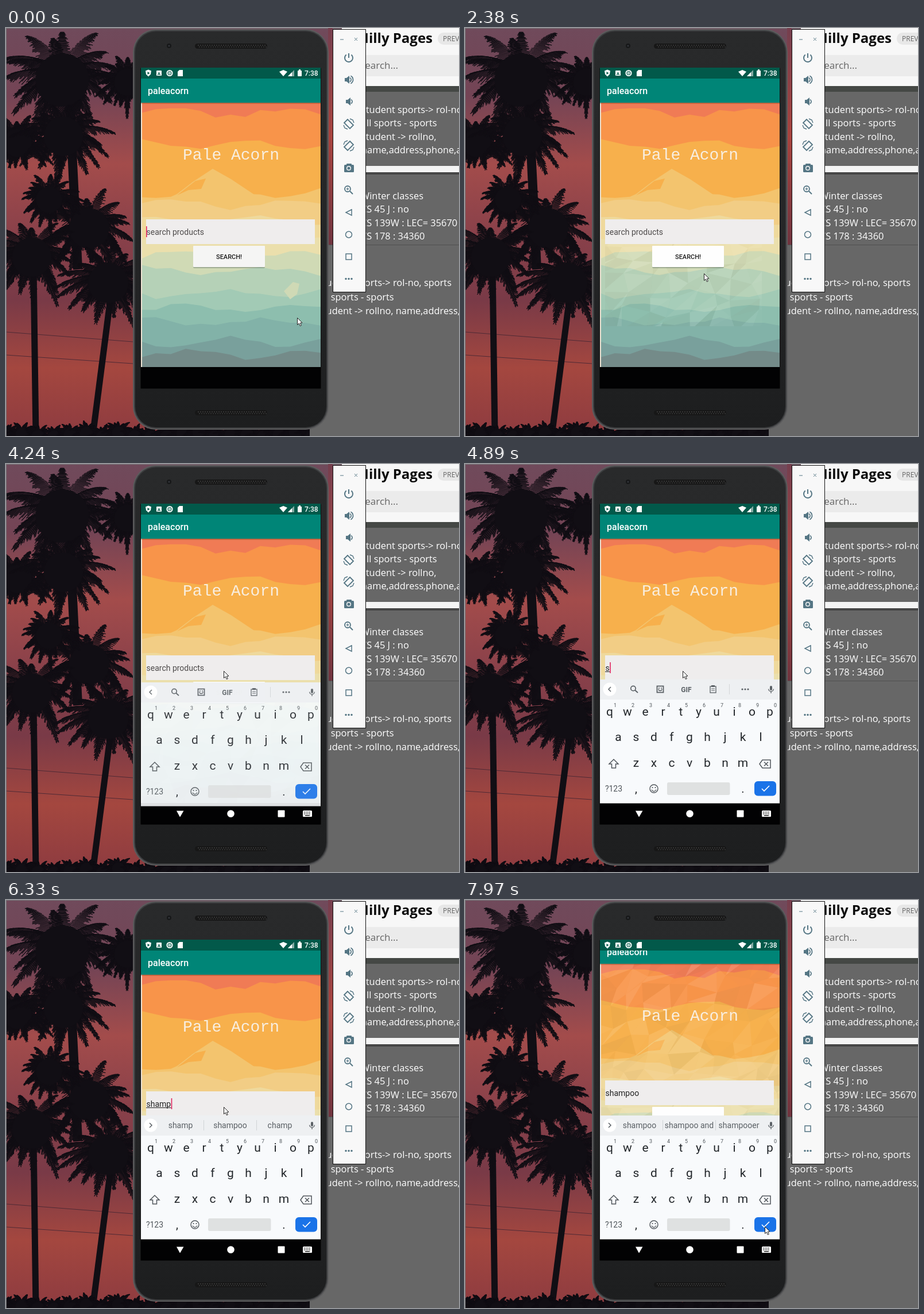
Write an HTML page with a canvas that moves like this. It is 789 px wide and 710 px high and loops after 8000 ms.

```html
<!DOCTYPE html>
<html lang="en">
<head>
<meta charset="utf-8">
<title>Product search demo</title>
<style>
html, body { margin: 0; width: 100%; height: 100%; overflow: hidden; background: #676767; }
canvas { display: block; }
</style>
</head>
<body>
<canvas id="stage" width="789" height="710"></canvas>
<script>
const W = 789, H = 710, LOOP = 8000;
const SANS = '"Open Sans", "Noto Sans", sans-serif', ROBOTO = 'Roboto, sans-serif';
const screen = document.getElementById('stage').getContext('2d');
let g = screen;

// Drawing helpers
function rect(x, y, w, h, fill, r = 0) {
  g.fillStyle = fill;
  g.beginPath();
  g.roundRect(x, y, w, h, r);
  g.fill();
}
function disc(x, y, r, fill) {
  g.fillStyle = fill;
  g.beginPath();
  g.arc(x, y, r, 0, 7);
  g.fill();
}
function ring(x, y, r, color, width = 1.5, from = 0, to = 7) {
  g.strokeStyle = color;
  g.lineWidth = width;
  g.beginPath();
  g.arc(x, y, r, from, to);
  g.stroke();
}
function trace(points, x = 0, y = 0) {
  g.beginPath();
  for (let i = 0; i < points.length; i += 2) g.lineTo(x + points[i], y + points[i + 1]);
}
function line(points, color, width = 1.5, x = 0, y = 0) {
  trace(points, x, y);
  g.strokeStyle = color;
  g.lineWidth = width;
  g.stroke();
}
function poly(points, fill, x = 0, y = 0) {
  trace(points, x, y);
  g.fillStyle = fill;
  g.fill();
}
function text(str, x, y, font, fill, align = 'left') {
  g.font = font;
  g.fillStyle = fill;
  g.textAlign = align;
  g.fillText(str, x, y);
}
function layer(draw) {
  const canvas = document.createElement('canvas');
  canvas.width = W;
  canvas.height = H;
  g = canvas.getContext('2d');
  draw();
  g = screen;
  return canvas;
}
function seeded(seed) {
  return () => (seed = seed * 16807 % 2147483647) / 2147483647;
}
function gradient(y0, y1, ...colors) {
  const fill = g.createLinearGradient(0, y0, 0, y1);
  colors.forEach((c, i) => fill.addColorStop(i / (colors.length - 1), c));
  return fill;
}

// Dusk sky behind dense palm silhouettes
const BARK = '#110e14';
function palm(x, y, reach, rand) {
  const fronds = 19;
  for (let i = 0; i < fronds; i++) {
    const a = (i + rand()) / fronds * Math.PI * 2, len = reach * (.7 + rand() * .4);
    const [cos, sin] = [Math.cos(a), Math.sin(a)];
    for (let s = .08; s < 1; s += .022) {
      const px = x + cos * len * s, py = y + len * (sin * .85 * s + .38 * s * s - .12 * s);
      const leaf = reach * .27 * (1.15 - s) * (.6 + rand() * .6);
      for (const side of [-1, 1]) {
        const b = a + side * .6;
        line([px, py, px + Math.cos(b) * leaf, py + Math.sin(b) * leaf * .7 + leaf * .6], BARK, 1.3);
      }
    }
  }
  disc(x, y + reach * .15, reach * .38, BARK);
}
function photo() {
  rect(0, 0, 585, H, gradient(0, H, '#704a5b', '#744455', '#a34c4b', '#8a414a', '#793a47', '#a4473f', '#8d3b40'));
  line([0, 529, 221, 546], '#4f2a35', 1);
  line([0, 569, 221, 584], '#4f2a35', 1);
  const rand = seeded(71);
  line([48, 420, 52, H], BARK, 11);
  line([182, 470, 151, H], BARK, 11);
  line([108, 70, 125, 420], BARK, 16);
  for (const [x, y, reach] of [[98, 72, 122], [212, 85, 62], [20, 190, 65], [100, 175, 90], [145, 335, 92], [45, 385, 90], [178, 430, 92], [75, 290, 60]])
    palm(x, y, reach, rand);
  for (let x = 0; x < 540; x += 28) palm(x, 698 + rand() * 10, 30, rand);
  rect(0, 0, 1, H, '#77777a');
  rect(0, 0, 585, 1, '#77777a');
}

function notes() {
  rect(585, 0, 204, 101, '#f7f7f7');
  text('Hilly Pages', 743, 26, 'bold 24px ' + SANS, '#0b0b0b', 'right');
  rect(752, 8, 60, 21, '#e7e7e7', 10);
  text('PREVIEW', 761, 23, '12px ' + SANS, '#666');
  rect(585, 47, 204, 37, '#ebebeb');
  text('Search...', 616, 71, '17px ' + SANS, '#666');
  rect(585, 101, 204, 10, '#454845');
  rect(585, 111, 204, 266, '#676767');
  rect(585, 240, 204, 11, '#f4f4f4');
  rect(585, 251, 204, 4, '#464646');
  rect(561, 0, 8, 377, gradient(0, 377, '#753f4e', '#a9443f', '#70343f'));
  rect(529, 377, 260, 333, '#676767');
  rect(561, 377, 228, 1, '#515151');
  const write = (lines, x, y, gap) => lines.forEach((s, i) => text(s, x, y + i * gap, '16.4px ' + SANS, '#fff'));
  write(['student sports-> rol-no, sports', 'all sports - sports', 'student -> rollno,', 'name,address,phone,age'], 619, 148, 23.3);
  write(['Winter classes', 'CS 45 J : no', 'CS 139W : LEC= 35670', 'CS 178 : 34360'], 618, 298, 23.4);
  write(['student sports-> rol-no, sports', 'all sports - sports', 'student -> rollno, name,address,phone'], 544, 449, 24.5);
}

function emulatorBar() {
  const c = '#557684', x = 597;
  rect(569, 2, 58, 458, '#111');
  rect(570, 3, 56, 456, '#f8f8f8');
  line([582, 20, 588, 20], c, 1);
  line([607, 17, 612, 22], c, 1);
  line([612, 17, 607, 22], c, 1);
  ring(x, 52, 7, c, 2, -.9, 4.05);
  line([x, 44, x, 52], c, 2);
  for (const [y, dx] of [[90, 0], [128, 2]]) {
    poly([-7, -3, -4, -3, 1, -7, 1, 7, -4, 3, -7, 3], c, x + dx, y);
    ring(x + dx, y, 4, c, 1.8, -1.1, 1.1);
    if (!dx) ring(x, y, 7.5, c, 1.8, -1.1, 1.1);
  }
  for (const [y, s] of [[167, 1], [205, -1]]) {
    line([-8 * s, -2, -2 * s, -8, 8 * s, 2, 2 * s, 8, -8 * s, -2, -2 * s, -8], c, 1.8, x, y);
    for (const k of [-1, 1]) line([2 * s * k, -9 * k, 7 * s * k, -7 * k, 9 * s * k, -2 * k], c, 1.4, x, y);
  }
  rect(589, 238, 17, 13, c, 1.5);
  rect(593, 236, 9, 4, c, 1);
  disc(x, 244, 4, '#f8f8f8');
  disc(x, 244, 2.6, c);
  ring(595, 280, 5, c, 1.8);
  line([599, 284, 604, 289], c, 2);
  line([592.5, 280, 597.5, 280], c, 1.2);
  line([595, 277.5, 595, 282.5], c, 1.2);
  line([602, 316, 592, 321, 602, 326, 602, 315], c, 1.5);
  ring(x, 359.5, 5.5, c, 1.5);
  g.strokeRect(592, 393, 10, 10);
  for (const dx of [-5, 0, 5]) disc(x + dx, 436.5, 1.7, c);
}

function phone() {
  rect(221, 2, 341, 697, '#5b5b5c', 40);
  rect(223, 4, 337, 693, '#3c3d3f', 38);
  rect(225, 6, 333, 689, gradient(6, 695, '#292a2b', '#252627', '#1d1e1f'), 36);
  rect(234, 69, 315, 559, '#111', 2);
  disc(284, 31, 4, '#171819');
  disc(284, 31, 1.6, '#34363c');
  for (const y of [27, 665]) {
    rect(329, y, 126, 9, '#171717', 4.5);
    for (let x = 334; x < 452; x += 4) {
      rect(x, y + 2, 2, 2, '#353535');
      rect(x + 2, y + 5, 2, 2, '#303030');
    }
  }
}

// Wallpaper: stacked jagged ridges, optionally broken into facets
const ridges = [['#f07b55', 120], ['#f8944a', 147], ['#f7b04c', 203], ['#f3c46e', 286], ['#f2cd85', 306],
  ['#efd99c', 336], ['#ebdfac', 366], ['#d0dab5', 395], ['#b5d1b7', 422], ['#a2cab5', 462],
  ['#8dbeae', 488], ['#82b2a8', 512], ['#79a09c', 546], ['#748b89', 567]];
function wallpaper(faceted) {
  const rand = seeded(29);
  g.beginPath();
  g.rect(235, 130, 313, 460);
  g.clip();
  ridges.forEach(([fill, base], i) => {
    const edge = [235, 590];
    for (let x = 235; x <= 575; x += 26)
      edge.push(x, base + 7 * Math.sin(x / 32 + i * 2) + (rand() - .5) * 8);
    poly([...edge, 575, 590], fill);
    if (i === 3) {
      poly([290, 295, 325, 268, 360, 245, 392, 263, 440, 295], fill);
      poly([298, 291, 330, 266, 348, 262, 340, 280, 318, 282], '#f7b04c');
    }
  });
  if (faceted) {
    const dx = 36, dy = 29, grid = [];
    for (let r = 0; r < 19; r++)
      grid.push(Array.from({ length: 12 }, (_, c) => [200 + (c + rand() * .8) * dx, 105 + (r + rand() * .8) * dy]));
    const shade = () => rand() < .5 ? `rgba(255,255,240,${rand() * .12})` : `rgba(110,100,70,${rand() * .07})`;
    for (let r = 0; r < 18; r++) for (let c = 0; c < 11; c++) {
      const [a, b, d, e] = [grid[r][c], grid[r][c + 1], grid[r + 1][c], grid[r + 1][c + 1]];
      poly([...a, ...b, ...d], shade());
      poly([...b, ...e, ...d], shade());
    }
  } else {
    poly([484, 458, 500, 442, 511, 445, 507, 463, 495, 472], '#cfd9b5');
  }
  rect(235, 130, 2, 460, '#eee4d4');
}

const backdrop = layer(() => { photo(); notes(); phone(); emulatorBar(); });
const flatWall = layer(() => wallpaper(false));
const facetWall = layer(() => wallpaper(true));

function statusBar() {
  rect(235, 69, 313, 19, '#02594a');
  poly([0, -6, 5, -4, 4, 2, 0, 6, -4, 2, -5, -4], '#fff', 248, 78.5);
  poly([-1.5, -2.5, 2.5, 0, -1.5, 2.5], '#02594a', 248, 78.5);
  rect(262, 74, 9, 9, '#fff', 1);
  text('A', 266.5, 82, 'bold 8px ' + ROBOTO, '#02594a', 'center');
  ring(285, 78.5, 4.6, '#fff', 2);
  disc(285, 78.5, 2.8, '#aac8c3');
  poly([0, 3, 3, 0, 9, 0, 9, 11, 0, 11], '#fff', 299, 73);
  poly([476, 76, 483, 73, 490, 76, 483, 84], '#fff');
  poly([491, 84, 502, 84, 502, 73], '#86aaa4');
  poly([491, 84, 498, 84, 498, 77], '#fff');
  rect(508, 74, 7, 10, '#fff', 1);
  rect(510, 72, 3, 3, '#fff');
  text('7:38', 520, 83, '500 12px ' + ROBOTO, '#fff');
}

// Timing
const NAV_SHOWN = 4120, KEYS_RISE = 4240, KEYS_UP = 4390, FOCUS_LOST = 6970, SCROLLED = 7970;
const WORD = 'shampoo', keyTimes = [4890, 5200, 5480, 5910, 6180, 6450, 6580], LAG = 135;
const lettersAt = t => keyTimes.filter(k => k <= t).length;
const suggestions = ['s so she', 'sh she should', 'sha shall share', 'sham same shame', 'shamp shampoo champ', 'shampo shampoo shampoos']
  .map(s => s.split(' ')).concat([['shampoo', 'shampoo and', 'shampooer']]);

function caretOn(t) {
  if (t < NAV_SHOWN) return Math.floor((t - 310) / 508) % 2 !== 0;
  return t >= keyTimes[0] && t < FOCUS_LOST;
}

// The pointer advances in hard steps along straight moves
const TICK = 125;
const moves = [[60, 2, 416, 427], [2970, 4, 379, 360], [6985, 3, 514, 561], [7395, 1, 522, 568]];
function pointerAt(t) {
  let [x, y] = [507, 504];
  for (const [from, ticks, toX, toY] of moves) {
    const p = Math.max(0, Math.min(1, Math.floor((t - from) / TICK) / ticks));
    x += (toX - x) * p;
    y += (toY - y) * p;
  }
  return [x, y];
}

function app(t) {
  const scrolled = t >= SCROLLED, touched = t >= 310;
  g.save();
  g.beginPath();
  g.rect(235, 88, 313, 502);
  g.clip();
  if (scrolled) g.translate(0, -19);
  g.drawImage(scrolled ? facetWall : flatWall, 0, 0);
  const facets = t >= NAV_SHOWN ? [235, 400, 313, 190] : touched ? [244, 376, 273, 143] : null;
  if (facets && !scrolled) g.drawImage(facetWall, ...facets, ...facets);
  rect(235, 88, 313, 42, '#008577');
  rect(235, 130, 313, 2, 'rgba(90,50,20,.3)');
  text('paleacorn', 247, 115, '500 16px ' + ROBOTO, '#fff');
  text('Pale Acorn', 308, 229, '28px "Liberation Mono", monospace', '#f8eee0');

  rect(244, 333, 294, 43, '#efeded');
  const typed = WORD.slice(0, lettersAt(t)), font = '14px ' + ROBOTO;
  text(typed || 'search products', 244.5, 359.5, font, typed ? '#222' : '#4e4b4b');
  const underlined = typed.slice(0, Math.max(1, lettersAt(t - LAG)));
  if (underlined && !scrolled) rect(244, 361, g.measureText(underlined).width + 1, 1, '#222');
  if (caretOn(t)) rect(typed ? 245 + g.measureText(typed).width : 244, 345, 1.6, 19, '#e0245e');

  rect(326, 380, 125, 38, 'rgba(70,90,80,.35)', 2);
  rect(326, 379, 125, 37, touched ? '#fefefe' : '#f5f5f4', 1);
  text('SEARCH!', 388.5, 402, '500 11px ' + ROBOTO, '#1c1c1c', 'center');
  g.restore();
}

function navBar(t) {
  rect(235, 590, 313, 37, '#020203');
  if (t < NAV_SHOWN) return;
  poly([297, 603.5, 309.5, 603.5, 303, 614.5], '#fff');
  disc(391.5, 608.5, 6.3, '#fff');
  rect(473.5, 602.5, 12, 12, '#fff', 1);
  rect(517, 603, 16, 11, '#fff', 1.5);
  for (let x = 519; x < 531; x += 3) for (const y of [605, 608]) rect(x, y, 1.5, 1.5, '#000');
  rect(521, 611, 8, 1.3, '#000');
}

function strip(t) {
  const c = '#5a6065', y = 392, open = t >= keyTimes[1], d = open ? 2 : -2;
  disc(252, y, 11.5, '#fff');
  line([-d, -4, d, 0, -d, 4], c, 1.5, 252, y);
  rect(531, 386, 4, 8, c, 2);
  ring(533, 391.5, 4.3, c, 1.3, 0, Math.PI);
  line([533, 396, 533, 399], c, 1.3);
  if (open) {
    suggestions[lettersAt(t - LAG) - 1].forEach((w, i) => text(w, 304 + i * 86.5, 397, '14px ' + ROBOTO, c, 'center'));
    for (const x of [344, 436]) rect(x, 383, 1, 18, '#cfd3d6');
    return;
  }
  ring(293, 390.5, 4.2, c, 1.7);
  line([296, 393.5, 301, 398], c, 1.8);
  g.strokeRect(334.5, 386.5, 11, 11);
  ring(340, 391.5, 3, c, 1.3, 0, Math.PI);
  for (const x of [338, 342]) disc(x, 390, 1, c);
  text('GIF', 385.5, 396.5, 'bold 12px ' + ROBOTO, c, 'center');
  g.strokeStyle = c;
  g.strokeRect(427, 387, 10, 11);
  rect(429, 385, 6, 3, c);
  for (const dy of [391, 394]) line([429, dy, 435, dy], c, 1);
  rect(460, 383, 1, 18, '#d3d6d8');
  for (const x of [483, 488, 493]) disc(x, y, 1.6, c);
}

function keyboard(t) {
  if (t < KEYS_RISE) return;
  const ink = '#22262a', soft = '#50565b';
  g.save();
  if (t < KEYS_UP) {
    g.translate(0, 5);
    g.globalAlpha = .9;
  }
  rect(235, 375, 313, 215.5, '#f8fafc');
  rect(235, 375, 313, 35, '#eef0f2');
  strip(t);
  const row = (keys, x, y, size = 21, color = ink) =>
    [...keys].forEach((k, i) => text(k, x + i * 31, y, size + 'px ' + ROBOTO, color, 'center'));
  row('qwertyuiop', 252, 438);
  row('asdfghjkl', 267, 482);
  row('zxcvbnm', 298, 527);
  row('1234567890', 261.5, 423, 9, soft);
  line([-3.5, 7, -3.5, 0, -8, 0, 0, -8, 8, 0, 3.5, 0, 3.5, 7, -3.5, 7, -3.5, 0], soft, 1.5, 259, 522);
  line([-10, 0, -5, -7, 9, -7, 9, 7, -5, 7, -10, 0, -5, -7], soft, 1.5, 523, 522);
  for (const k of [-1, 1]) line([-3.5, -3.5 * k, 3.5, 3.5 * k], soft, 1.5, 524.5, 522);
  text('?123', 259, 570, '14px ' + ROBOTO, soft, 'center');
  text(',', 298, 572, '20px ' + ROBOTO, ink, 'center');
  text('.', 484, 572, '20px ' + ROBOTO, ink, 'center');
  ring(329, 565, 7, soft, 1.4);
  ring(329, 565.5, 4, soft, 1.3, .3, 2.85);
  for (const x of [326.5, 331.5]) disc(x, 563, 1.1, soft);
  rect(352, 554, 109.5, 22, '#dfe1e1', 3);
  rect(504, 552, 38, 25.5, '#1a73e8', 6);
  line([517, 565, 521, 569, 530, 560], '#fff', 1.6);
  g.restore();
}

function mouse(t) {
  const arrow = [.5, .5, .5, 12.5, 3.3, 10, 5.3, 14.5, 7.3, 13.6, 5.4, 9.2, 9, 9, .5, .5];
  poly(arrow, '#fff', ...pointerAt(t));
  line(arrow, '#222', 1, ...pointerAt(t));
}

const start = performance.now();
function frame() {
  const t = (performance.now() - start) % LOOP;
  g.drawImage(backdrop, 0, 0);
  app(t);
  statusBar();
  navBar(t);
  keyboard(t);
  mouse(t);
  requestAnimationFrame(frame);
}
frame();
</script>
</body>
</html>
```
